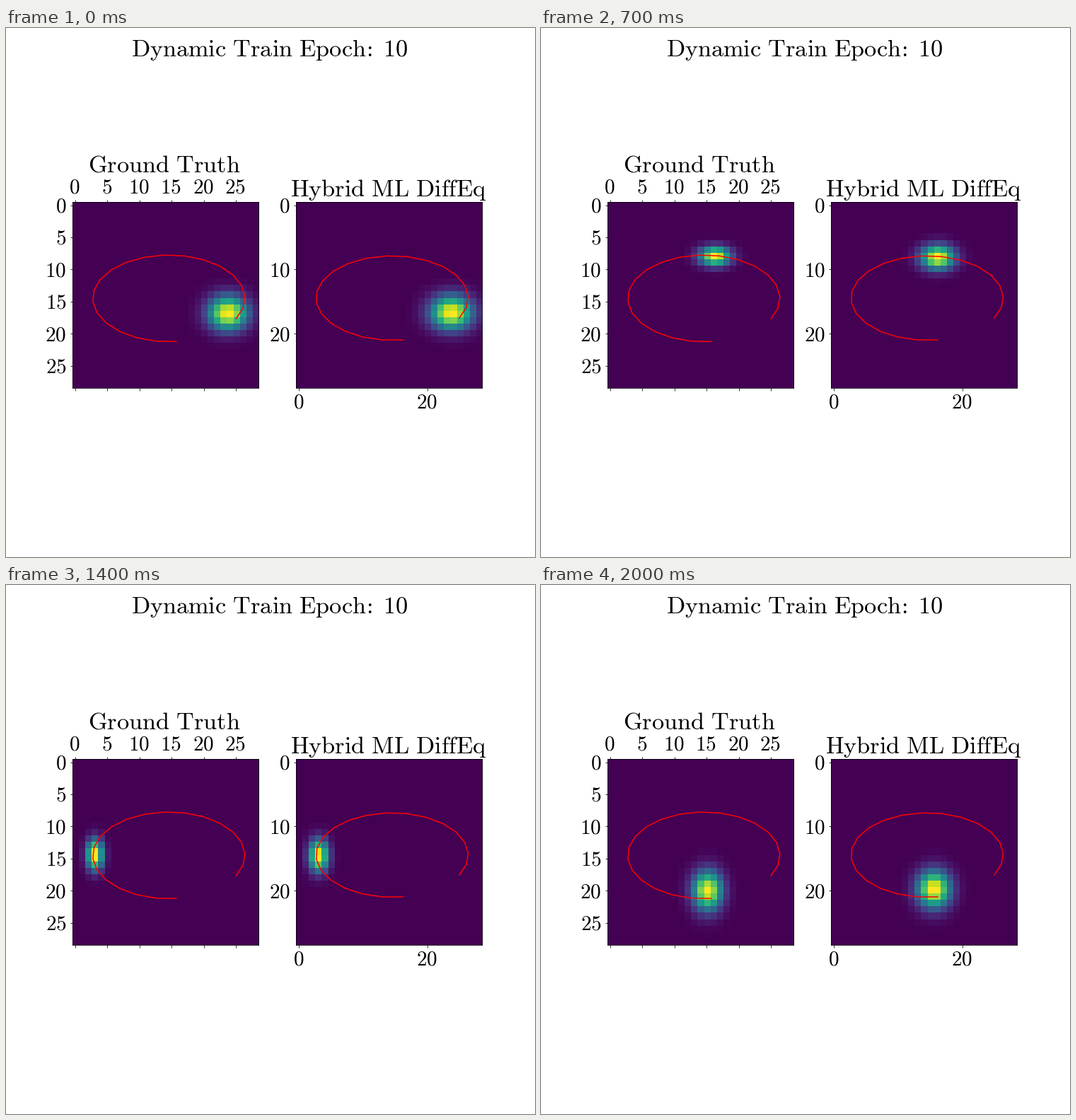
Write a matplotlib script that moves like this. It is 748x748 px and loops after 2.1 s.

```python
import numpy as np
import matplotlib.pyplot as plt
from matplotlib.animation import FuncAnimation

SIZE, DPI, STEPS, CELLS = 748, 100, 21, 29
PX = 72 / DPI  # one pixel in points
TITLE, LABEL = 34.3 * PX, 29.3 * PX

plt.rcParams.update({
    "mathtext.fontset": "cm",
    "axes.linewidth": 0.8 * PX,
    "xtick.major.size": 3.5 * PX, "xtick.major.width": 0.8 * PX,
    "ytick.major.size": 3.5 * PX, "ytick.major.width": 0.8 * PX,
})

grid = np.arange(CELLS)


def wave(mean, swing, unit):
    return mean + swing * unit


def bell(centre, spread):
    return np.exp(-0.5 * ((grid - centre) / spread) ** 2)


class Panel:
    """A blob circling on a heat map, with the path of its mean in red.

    Centre and spread on each axis swing with the same phase;
    every axis setting is a (mean, swing) pair.
    """

    def __init__(self, ax, start, turn, path, centre, spread):
        angle = np.radians(start - turn * np.arange(STEPS))
        self.unit = np.array([np.cos(angle), np.sin(angle)])
        self.centre, self.spread = centre, spread
        self.im = ax.imshow(self.blob(0), vmin=0, vmax=1, cmap="viridis",
                            interpolation="nearest")
        x, y = (wave(*p, u) for p, u in zip(path, self.unit))
        ax.plot(x, y, color="red", lw=1.5 * PX)
        ax.set(xlim=(-0.5, CELLS - 0.5), ylim=(CELLS - 0.5, -0.5))

    def blob(self, i):
        bx, by = (bell(wave(*c, u), wave(*s, u))
                  for c, s, u in zip(self.centre, self.spread, self.unit[:, i]))
        z = np.outer(by, bx)
        return z / z.max()

    def show(self, i):
        self.im.set_data(self.blob(i))
        return self.im


def put(x, y, words, size, ha="center"):
    """Roman text with its baseline at pixel (x, y) from the top left."""
    fig.text(x / SIZE, 1 - y / SIZE, r"$\mathrm{%s}$" % words.replace(" ", r"\ "),
             size=size, ha=ha, va="baseline")


def label_axes(ax, xticks, yticks, baseline, top=False):
    ax.set(xticks=xticks, yticks=yticks)
    ax.tick_params(top=top, labelleft=False, labelbottom=False)
    ax.apply_aspect()
    box = ax.get_position()
    x0, y0 = box.x0 * SIZE, (1 - box.y1) * SIZE
    cell = box.width * SIZE / CELLS
    for v in xticks:
        put(x0 + (v + 0.5) * cell - 1, baseline, str(v), LABEL)
    for v in yticks:
        put(x0 - 8, y0 + (v + 0.5) * cell + 9.8, str(v), LABEL, "right")


fig, (ax1, ax2) = plt.subplots(1, 2, figsize=(SIZE / DPI, SIZE / DPI), dpi=DPI)

panels = [
    Panel(ax1, start=28, turn=15.18,
          path=[(14.55, 11.85), (14.5, 6.75)],
          centre=[(13.95, 11), (14, 6.1)],
          spread=[(1.5, 0.65), (1.55, 0.55)]),
    Panel(ax2, start=28.2, turn=15.31,
          path=[(14.5, 11.85), (14.45, 6.57)],
          centre=[(13.95, 11), (14, 5.9)],
          spread=[(1.65, 0.65), (1.63, 0.35)]),
]

label_axes(ax1, range(0, CELLS, 5), range(0, CELLS, 5), 233, top=True)
label_axes(ax2, [0, 20], [0, 10, 20], 538)

put(373, 39.5, r"Dynamic Train Epoch\!:\;10", TITLE)
put(223.7, 203, "Ground Truth", TITLE)
put(540.7, 238, "Hybrid ML DiffEq", TITLE)


def update(i):
    return [panel.show(i) for panel in panels]


anim = FuncAnimation(fig, update, frames=STEPS, interval=100,
                     repeat=True, repeat_delay=0)
plt.show()
```
